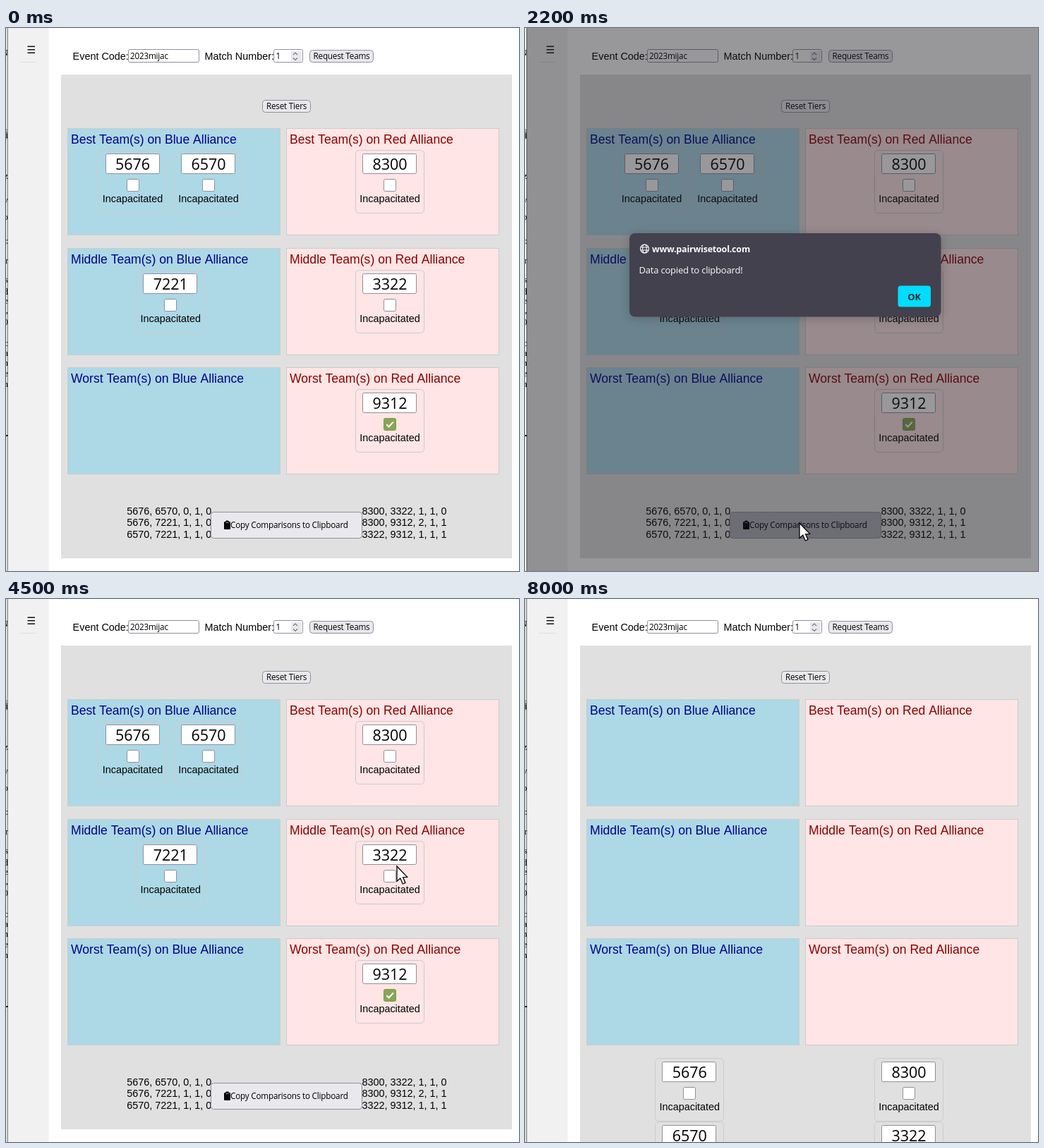
Animation of 727x770 px, one loop 8500 ms. Source, as an HTML page with a canvas:

```html
<!DOCTYPE html>
<html lang="en">
<head>
<meta charset="utf-8">
<title>Tier comparison</title>
<style>
html, body { margin: 0; width: 100%; height: 100%; overflow: hidden; background: #fff; }
canvas { display: block; }
</style>
</head>
<body>
<canvas id="stage" width="727" height="770"></canvas>
<script>
const ctx = document.getElementById('stage').getContext('2d');
const LOOP = 8500;
const ARIAL = '"Liberation Sans", Arial, sans-serif';
const UI = '"Open Sans", "Noto Sans", sans-serif';
const EDGE = '#8f8f9d';
const ROWS = [['Best', 142], ['Middle', 312], ['Worst', 481]];
const SIDES = [
  { name: 'Blue', x: 87, fill: '#add8e6', ink: '#00008b' },
  { name: 'Red', x: 397, fill: '#ffe5e5', ink: '#8b0000' }
];
const BLUE_X = 233.3, RED_X = 544;

// Pointer keys: time, x, y, eased
const PATH = [
  [800, 150, 1], [900, 332, 190], [1000, 466, 455], [1100, 466, 455],
  [1200, 491, 585], [1300, 425, 689], [1400, 425, 689], [1500, 412, 693],
  [1600, 396, 699], [1700, 389, 702], [3600, 389, 702], [3700, 482, 520],
  [3800, 554, 379], [4900, 554, 379], [5800, 403, 107, true],
  [5900, 406, 102], [7400, 406, 102], [8000, 78, -14, true]
];

function pointer(t) {
  if (t < 800 || t >= 8000) return null;
  const i = PATH.findIndex(k => k[0] > t);
  const a = PATH[i - 1], b = PATH[i];
  let u = (t - a[0]) / (b[0] - a[0]);
  if (b[3]) u = u * u * (3 - 2 * u);
  return { x: a[1] + (b[1] - a[1]) * u, y: a[2] + (b[2] - a[2]) * u };
}

function rect(x, y, w, h, fill) {
  ctx.fillStyle = fill;
  ctx.fillRect(x, y, w, h);
}

function box(x, y, w, h, r, fill, edge) {
  ctx.beginPath();
  ctx.roundRect(x, y, w, h, r);
  if (fill) { ctx.fillStyle = fill; ctx.fill(); }
  if (edge) { ctx.strokeStyle = edge; ctx.lineWidth = 1; ctx.stroke(); }
}

function text(s, x, y, size, { font = ARIAL, color = '#000', align = 'left', weight = '', gap = 0 } = {}) {
  ctx.font = `${weight} ${size}px ${font}`;
  ctx.letterSpacing = gap + 'px';
  ctx.textAlign = align;
  ctx.fillStyle = color;
  ctx.fillText(s, x, y);
}

function line(points, color, width) {
  ctx.beginPath();
  points.forEach(([x, y]) => ctx.lineTo(x, y));
  ctx.strokeStyle = color;
  ctx.lineWidth = width;
  ctx.stroke();
}

const uiText = (s, x, y, align) => text(s, x, y, 11.7, { font: UI, align, gap: -0.2 });

function leftEdge(modal) {
  rect(0, 0, 1, 770, modal ? '#f4f4f4' : '#e2e2e2');
  rect(1, 0, 1, 770, modal ? '#ececec' : '#cfcfcf');
  rect(2, 0, 1, 770, '#8a8a8a');
  rect(0, 143, 2, 15, '#a9aaa2');
  ctx.save();
  ctx.beginPath();
  ctx.rect(0, 0, 3, 770);
  ctx.clip();
  const bits = 'N 39 i 156 z 214 v 248 o 272 : 306 r 334 s 361 d 378 e 391 , 404 0 421 c 451 a 465 n 479 e 494 n 509'.split(' ');
  for (let i = 0; i < bits.length; i += 2)
    text(bits[i], 3, +bits[i + 1], 13, { font: '"Liberation Serif", serif', align: 'right' });
  ctx.restore();
  rect(0, 577, 3, 2, '#222');
}

function sidebar() {
  rect(3, 0, 57.5, 770, '#f1f1f1');
  for (const y of [25.5, 30, 34.5]) rect(30.5, y, 10.5, 1.4, '#000');
  rect(20, 48, 23, 1, '#dddddd');
}

function topBar() {
  text('Event Code:', 94.6, 45, 14.4);
  box(173.5, 30.5, 100, 18, 2, '#fff', EDGE);
  uiText('2023mijac', 176, 44);
  text('Match Number:', 281.6, 45, 14.4);
  box(379.5, 30.5, 41, 18, 2, '#fff', EDGE);
  uiText('1', 382.5, 44);
  rect(404, 33, 15, 14, '#e9e9ed');
  line([[407, 38], [410, 35], [413, 38]], '#77777f', 1.2);
  line([[407, 42.5], [410, 45.5], [413, 42.5]], '#77777f', 1.2);
  box(430.5, 31.5, 90, 17, 4, '#e9e9ed', EDGE);
  uiText('Request Teams', 475.5, 44, 'center');
}

function tiers() {
  for (const side of SIDES)
    for (const [rank, y] of ROWS) {
      rect(side.x, y, 302, 152, '#cccccc');
      rect(side.x + 1, y + 1, 300, 150, side.fill);
      text(`${rank} Team(s) on ${side.name} Alliance`, side.x + 5, y + 22, 17.6, { color: side.ink });
    }
}

function card(team, cx, top, checked) {
  const left = w => Math.floor(cx - w) + 0.5;
  box(left(49), top, 97, 89, 5, null, '#cccccc');
  box(left(38.5), top + 5, 76, 28, 2, '#fff', EDGE);
  text(team, cx, top + 27.5, 21.5, { font: UI, weight: 500, align: 'center' });
  const x = left(8.5), y = top + 41;
  box(x, y, 17, 17, 2, checked ? '#87a556' : '#fff', checked ? '#7f9d50' : EDGE);
  if (checked) line([[x + 3.8, y + 8.8], [x + 7, y + 12], [x + 13.4, y + 5]], '#fff', 2);
  text('Incapacitated', cx, top + 73.5, 14.4, { align: 'center' });
}

function ranked(copyFill) {
  card('5676', 179.5, 173.5);
  card('6570', 287, 173.5);
  card('7221', BLUE_X, 343.5);
  card('8300', RED_X, 173.5);
  card('3322', RED_X, 343.5);
  card('9312', RED_X, 512.5, true);

  const lists = [
    [171.3, ['5676, 6570, 0, 1, 0', '5676, 7221, 1, 1, 0', '6570, 7221, 1, 1, 0']],
    [504.4, ['8300, 3322, 1, 1, 0', '8300, 9312, 2, 1, 1', '3322, 9312, 1, 1, 1']]
  ];
  for (const [x, rows] of lists)
    rows.forEach((s, i) => text(s, x, Math.round(690 + 16.3 * i), 14.4));

  box(290.5, 686.5, 214, 37, 4, copyFill, EDGE);
  box(309, 700, 9, 11, 1.2, '#000');
  box(311.2, 698.6, 4.6, 3, 1.2, '#000');
  rect(311.5, 701.3, 4, 0.7, copyFill);
  uiText('Copy Comparisons to Clipboard', 318, 709);
}

function unranked() {
  card('5676', BLUE_X, 651.5);
  card('6570', BLUE_X, 741.5);
  card('8300', RED_X, 651.5);
  card('3322', RED_X, 741.5);
}

function globe(x, y) {
  ctx.strokeStyle = '#fbfbfe';
  ctx.lineWidth = 1.1;
  for (const rx of [6, 2.8]) {
    ctx.beginPath();
    ctx.ellipse(x, y, rx, 6, 0, 0, Math.PI * 2);
    ctx.stroke();
  }
  for (const dy of [-2, 2]) line([[x - 5.6, y + dy], [x + 5.6, y + dy]], '#fbfbfe', 1);
}

function dialog(okFill) {
  rect(2, 0, 725, 770, 'rgba(28,27,34,0.45)');
  ctx.save();
  ctx.shadowColor = 'rgba(0,0,0,0.2)';
  ctx.shadowBlur = 14;
  ctx.shadowOffsetY = 2;
  box(148, 291, 441.5, 118.5, 8, '#42414d');
  ctx.restore();
  globe(169.5, 313);
  const color = '#fbfbfe';
  text('www.pairwisetool.com', 180, 318, 12.5, { font: UI, weight: 'bold', gap: -0.2, color });
  text('Data copied to clipboard!', 161.5, 348, 13, { font: UI, gap: -0.2, color });
  box(528.5, 365.5, 46.5, 30, 4, okFill);
  text('OK', 551.7, 385.5, 13, { font: UI, weight: 'bold', align: 'center', color: '#2b2a33' });
}

function arrow({ x, y }) {
  ctx.save();
  ctx.translate(x, y);
  ctx.beginPath();
  for (const p of [[0, 0], [0, 21.2], [4.8, 17], [8.3, 25], [12, 23.4], [8.6, 15.6], [14.6, 15.4]])
    ctx.lineTo(...p);
  ctx.closePath();
  ctx.fillStyle = '#fff';
  ctx.fill();
  ctx.strokeStyle = '#000';
  ctx.lineWidth = 1.3;
  ctx.stroke();
  ctx.restore();
}

const inside = (p, x, y, w, h) => p && p.x >= x && p.x <= x + w && p.y >= y && p.y <= y + h;
const shade = (over, down) => down ? '#b1b1b9' : over ? '#d0d0d7' : '#e9e9ed';

function draw(t) {
  const p = pointer(t);
  const modal = t >= 2200 && t < 4500;
  const reset = t >= 6400;

  rect(0, 0, 727, 770, '#fff');
  leftEdge(modal);
  sidebar();
  topBar();
  rect(78, 66, 639, reset ? 704 : 686, '#e0e0e0');
  box(363.5, 102.5, 68, 17, 4, shade(inside(p, 363, 102, 69, 18), t >= 6200 && !reset), EDGE);
  uiText('Reset Tiers', 397.5, 115, 'center');
  tiers();
  if (reset) unranked();
  else ranked(shade(inside(p, 290, 686, 215, 38), t >= 2000 && t < 4500));
  if (modal) dialog(t >= 4300 ? '#aaf2ff' : t >= 3800 ? '#80ebff' : '#00ddff');
  if (p) arrow(p);
}

// The screen refreshes ten times a second
function tick() {
  draw(Math.floor(performance.now() % LOOP / 100) * 100);
  requestAnimationFrame(tick);
}
tick();
</script>
</body>
</html>
```
